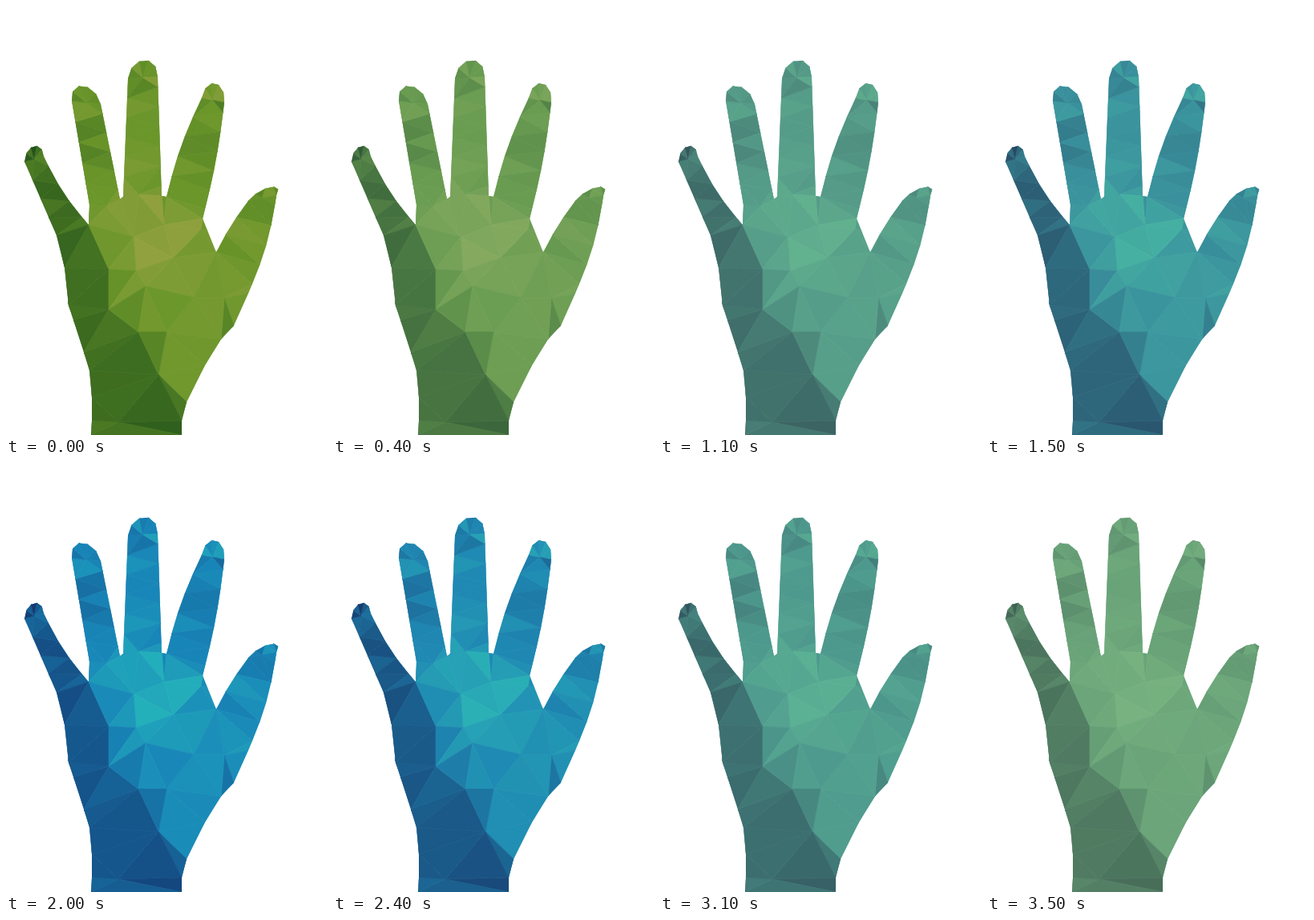
Animation of 400 by 533 pixels, one loop 3600 ms. Source, as an HTML page with a canvas:

```html
<!DOCTYPE html>
<html lang="en">
<head>
<meta charset="utf-8">
<title>Low-poly hand</title>
<style>
html, body { margin: 0; height: 100%; overflow: hidden; background: #fff; }
canvas { display: block; }
</style>
</head>
<body>
<canvas id="stage" width="400" height="533"></canvas>
<script>
const ctx = document.getElementById('stage').getContext('2d');
const LOOP = 3600, STEP = 100, FACET = 24;

// Gradients from shadow over middle to highlight.
const LEAF = [[24, 74, 24], [106, 150, 42], [178, 170, 80]];
const SAGE = [[58, 88, 78], [105, 163, 120], [130, 190, 135]];
const BLUE = [[14, 40, 105], [14, 130, 192], [35, 215, 196]];

const mix = (a, b, k) => a.map((v, i) => v + (b[i] - v) * k);
const dist = (a, b) => Math.hypot(a[0] - b[0], a[1] - b[1]);

// Points from a to b, bowed sideways; phase shifts them along the edge.
function edge(a, b, bow, phase) {
  const length = dist(a, b), n = Math.round(length / FACET);
  const points = [];
  for (let i = 0; i < n; i++) {
    const t = (i + phase) / n, out = bow * Math.sin(Math.PI * t) / length;
    const [x, y] = mix(a, b, t);
    points.push([x + (b[1] - a[1]) * out, y - (b[0] - a[0]) * out]);
  }
  return points;
}

// A finger: two staggered edges joined by half an ellipse.
function finger(baseL, baseR, endL, endR, tip, bowL = 0, bowR = 0) {
  const mid = mix(endL, endR, 0.5), cap = [];
  for (let i = 0; i <= 5; i++) {
    const a = Math.PI * i / 5;
    cap.push(mid.map((m, k) => m + (m - endR[k]) * Math.cos(a) + (tip[k] - m) * Math.sin(a)));
  }
  inner.push(mid);
  return [...edge(baseL, endL, bowL, 0), ...cap,
    ...edge(baseR, endR, bowR, 0.5).reverse(), baseR];
}

const inner = [[125, 249], [165, 234], [159, 287], [197, 272], [243, 277], [208, 313],
  [128, 327], [162, 329], [174, 348], [128, 377], [234, 362], [272, 363],
  [165, 405], [200, 405], [190, 458], [140, 517]];

const outline = [
  ...finger([63, 285], [103, 272], [23, 193], [47, 187], [35, 174], 0, 4),
  ...finger([104, 247], [142, 240], [82, 118], [118, 122], [96, 99]),
  ...finger([146, 237], [194, 236], [152, 90], [189, 88], [172, 67]),
  ...finger([200, 237], [245, 264], [244, 114], [272, 120], [261, 96], 4, -3),
  ...finger([262, 306], [302, 357], [302, 242], [337, 235], [329, 225], 2, -5),
  [284, 397], [268, 414], [248, 446], [225, 492], [219, 515], [219, 533],
  [106, 533], [107, 515], [107, 486], [104, 453], [97, 430], [84, 390], [78, 372], [73, 325]
];

function circumcircle([ax, ay], [bx, by], [cx, cy]) {
  const ux = bx - ax, uy = by - ay, vx = cx - ax, vy = cy - ay;
  const d = 2 * (ux * vy - uy * vx), u = ux * ux + uy * uy, v = vx * vx + vy * vy;
  const x = (vy * u - uy * v) / d, y = (ux * v - vx * u) / d;
  return { center: [ax + x, ay + y], radius: Math.hypot(x, y), area: Math.abs(d) / 4 };
}

// Light falls on the palm; the side left of a slanted ridge lies in shadow.
function toneAt(x, y, area) {
  const ridge = 128 + (y - 350) * (y > 350 ? 0.55 : 0.25);
  const side = 1 / (1 + Math.exp((ridge - x) / 12));
  const glow = Math.exp(-((x - 180) ** 2 + (y - 290) ** 2) / 5000);
  const seed = Math.abs(Math.sin(x * 12.9898 + y * 78.233) * 43758.5) % 1;
  const grain = (seed - 0.5) * (0.12 + 0.28 * Math.exp(-area / 400));
  return Math.min(1, Math.max(0, 0.2 + 0.3 * side + 0.24 * glow + grain));
}

// Delaunay: keep every triangle whose circumcircle holds no other point.
function triangulate(points) {
  const found = [], n = points.length;
  for (let i = 0; i < n; i++)
    for (let j = i + 1; j < n; j++)
      for (let k = j + 1; k < n; k++) {
        const corners = [points[i], points[j], points[k]];
        const { center, radius, area } = circumcircle(...corners);
        if (area < 0.01 || points.some(p => dist(p, center) < radius - 1e-6)) continue;
        const [x, y] = [0, 1].map(c => corners.reduce((sum, p) => sum + p[c], 0) / 3);
        found.push({ corners, tone: toneAt(x, y, area) });
      }
  return found;
}

function pathOf(points) {
  const path = new Path2D();
  points.forEach(p => path.lineTo(...p));
  path.closePath();
  return path;
}

const silhouette = pathOf(outline);
const facets = triangulate([...outline, ...inner])
  .map(({ corners, tone }) => ({ path: pathOf(corners), tone }));

function paletteAt(time) {
  const [from, to, k] = time < 800
    ? [LEAF, SAGE, time / 800]
    : [SAGE, BLUE, 1 - Math.abs(time - 2150) / 1350];
  return from.map((c, i) => mix(c, to[i], k));
}

function shade([dark, middle, light], tone) {
  const c = tone < 0.5 ? mix(dark, middle, tone * 2) : mix(middle, light, tone * 2 - 1);
  return `rgb(${c.map(Math.round)})`;
}

ctx.lineWidth = 0.7;
ctx.lineJoin = 'round';

function draw(time) {
  const palette = paletteAt(Math.floor(time % LOOP / STEP) * STEP);
  ctx.fillStyle = '#fff';
  ctx.fillRect(0, 0, 400, 533);
  ctx.save();
  ctx.clip(silhouette);
  for (const { path, tone } of facets) {
    ctx.fillStyle = ctx.strokeStyle = shade(palette, tone);
    ctx.fill(path);
    ctx.stroke(path);
  }
  ctx.restore();
}

const start = performance.now();
function tick() {
  draw(performance.now() - start);
  requestAnimationFrame(tick);
}
tick();
</script>
</body>
</html>
```
